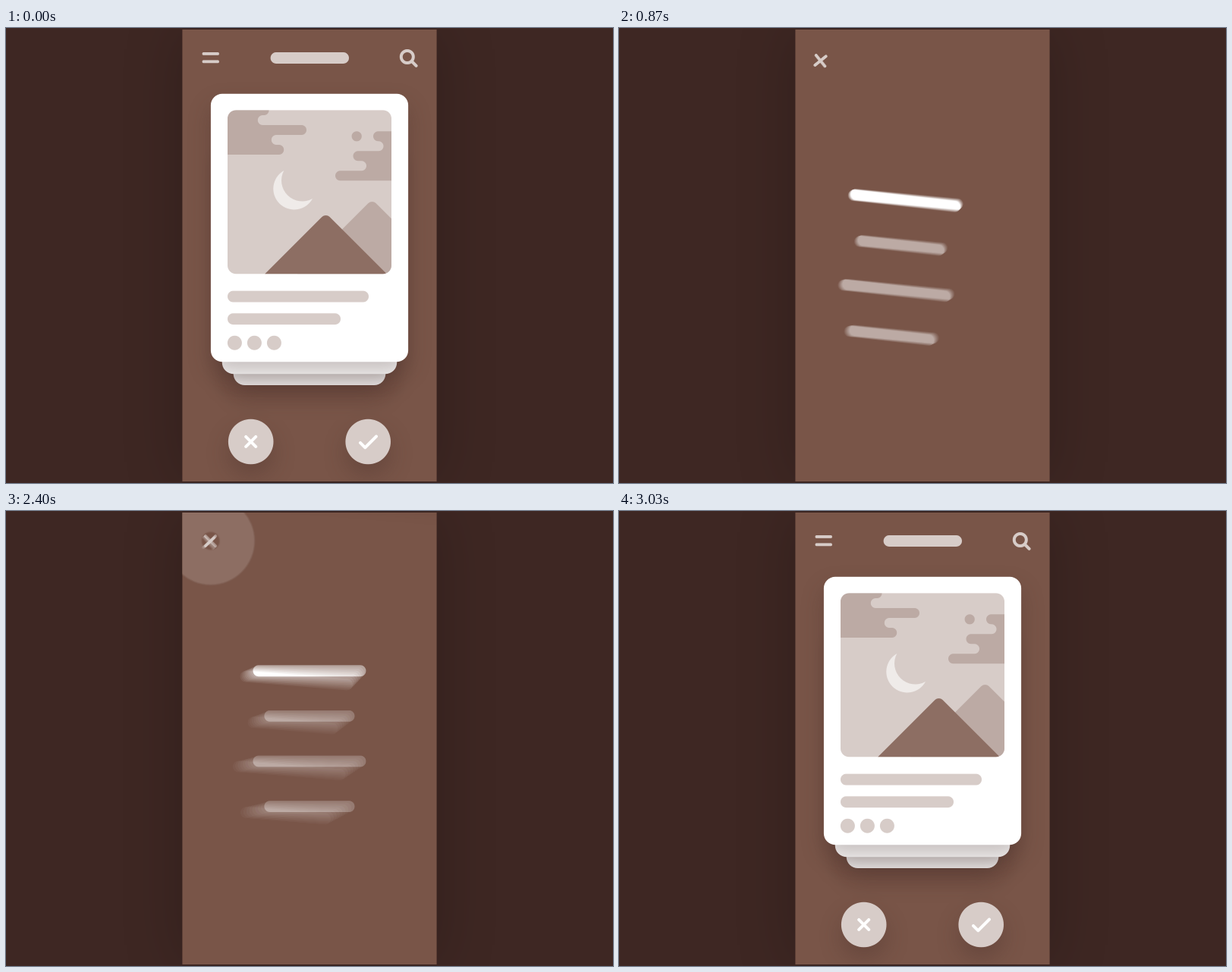
An HTML page with a canvas for the animation above (3.3 s loop, 800 px wide and 600 px high).

```html
<!DOCTYPE html>
<html lang="en">
<head>
<meta charset="utf-8">
<title>Rotating menu</title>
<style>
  html, body { margin: 0; width: 100%; height: 100%; overflow: hidden; background: #3e2723; }
  canvas { display: block; }
</style>
</head>
<body>
<canvas id="stage" width="800" height="600"></canvas>
<script>
const LOOP = 3300, HALF = 1800, STEP = 30;
const SPIN_START = 593, SPIN_TIME = 600, SHUTTER = 13, SAMPLES = 16;
const PIVOT = { x: 232, y: 2 };
const PANEL = [232.4, 2, 335.2, 596];
const BUTTON = { x: 269.7, y: 39.4, r: 37.2 };
const C = {
  back: '#3e2723', panel: '#795548', ring: '#8d6e63',
  light: '#d7ccc8', mid: '#bcaaa4', pale: '#efebe9', white: '#fff'
};

function makeCanvas(w, h) {
  const canvas = document.createElement('canvas');
  canvas.width = w;
  canvas.height = h;
  return canvas.getContext('2d');
}

function setShadow(g, color, blur, dy) {
  g.shadowColor = color;
  g.shadowBlur = blur;
  g.shadowOffsetY = dy;
}

function box(g, x, y, w, h, r, color) {
  g.fillStyle = color;
  g.beginPath();
  g.roundRect(x, y, w, h, r);
  g.fill();
}

function dot(g, x, y, r, color) {
  g.fillStyle = color;
  g.beginPath();
  g.arc(x, y, r, 0, 7);
  g.fill();
}

function shape(g, d, color) {
  g.fillStyle = color;
  g.fill(new Path2D(d));
}

function line(g, d, color, width = 4) {
  g.strokeStyle = color;
  g.lineWidth = width;
  g.lineCap = g.lineJoin = 'round';
  g.stroke(new Path2D(d));
}

function cross(g, x, y, color) {
  line(g, `M${x - 6.5} ${y - 6.5}l13 13m0 -13l-13 13`, color);
}

function mountain(g, x, y, color) {
  g.fillStyle = color;
  g.beginPath();
  g.moveTo(x - 110, y + 110);
  g.arcTo(x, y, x + 110, y + 110, 7.4);
  g.lineTo(x + 110, y + 110);
  g.fill();
}

function drawPicture(g) {
  const cap = 'A6.5 6.5 0 0 ';
  g.save();
  g.beginPath();
  g.roundRect(292, 108.4, 216, 215.8, 11);
  g.clip();
  g.fillStyle = C.light;
  g.fillRect(290, 106, 220, 220);
  shape(g, `M290 100H346.5V108.5${cap}1 340 115H338.3${cap}0 338.3 128H389.5${cap}1 389.5 141` +
    `H356.3${cap}0 356.3 154H359.7${cap}1 359.7 167H290Z`, C.mid);
  shape(g, `M510 136.3H490.5${cap}0 490.5 149.3H491${cap}1 491 162.3H464${cap}0 464 175.3` +
    `H468.5${cap}1 468.5 188.3H440.5${cap}0 440.5 201.3H510Z`, C.mid);
  dot(g, 462.2, 142.8, 6.6, C.mid);
  shape(g, 'M366.3 188A27.5 27.5 0 1 0 404 225A27.5 27.5 0 0 1 366.3 188Z', C.pale);
  mountain(g, 482.5, 226, C.mid);
  mountain(g, 421.5, 244, C.ring);
  g.restore();
}

function drawHome(g) {
  box(g, 258.6, 32, 22.3, 3.9, 1.8, C.light);
  box(g, 258.6, 42.4, 22.3, 3.9, 1.8, C.light);
  box(g, 348.6, 32, 103.4, 15, 7.5, C.light);
  line(g, 'M536.8 38a8 8 0 1 1 -16 0a8 8 0 1 1 16 0M535 44.2L540.6 49.8', C.light);

  setShadow(g, 'rgba(62,39,35,.3)', 60, 30);
  box(g, 299.7, 200, 200.6, 271, 15, C.white);
  box(g, 284.8, 150, 230.4, 306.2, 15, C.white);
  box(g, 269.9, 86.8, 260.2, 353.4, 15, C.white);
  dot(g, 322.7, 545.5, 29.8, C.light);
  dot(g, 477.2, 545.5, 29.8, C.light);
  setShadow(g, 'transparent', 0, 0);

  drawPicture(g);
  box(g, 292, 346.6, 186, 14.9, 7.4, C.light);
  box(g, 292, 376.2, 149, 14.9, 7.4, C.light);
  for (const x of [301.4, 327.4, 353.4]) dot(g, x, 415.2, 9.5, C.light);
  cross(g, 322.7, 545.5, C.white);
  line(g, 'M467 547l6.3 6.3l14.7 -14.7', C.white);
}

function drawMenu(g) {
  cross(g, 269.6, 39.5, C.light);
  for (let i = 0; i < 4; i++) {
    const w = i % 2 ? 119.2 : 149;
    box(g, 400 - w / 2, 203.3 + i * 59.6, w, 14.9, 7.4, i ? C.mid : C.white);
  }
}

// Pages are drawn once at double size, shadows included.
function renderPage(draw) {
  const g = makeCanvas(1000, 1400);
  g.scale(2, 2);
  g.translate(-PIVOT.x, -PIVOT.y);
  draw(g);
  return g.canvas;
}

function renderBackdrop() {
  const g = makeCanvas(800, 600);
  g.fillStyle = C.back;
  g.fillRect(0, 0, 800, 600);
  setShadow(g, 'rgba(0,0,0,.2)', 75, 0);
  g.fillStyle = C.panel;
  g.fillRect(...PANEL);
  return g.canvas;
}

const home = renderPage(drawHome), menu = renderPage(drawMenu);
const backdrop = renderBackdrop();
const screen = document.getElementById('stage').getContext('2d');
const scene = makeCanvas(800, 600);

const progress = (t, start, time) => Math.min(1, Math.max(0, (t - start) / time));
const sine = x => (1 - Math.cos(Math.PI * x)) / 2;
const backOut = x => 1 + 2.70158 * (x - 1) ** 3 + 1.70158 * (x - 1) ** 2;

function drawRipple(g, t) {
  if (t <= 0) return;
  const outer = BUTTON.r * (1 + sine(progress(t, 420, 320)));
  const hole = 2 * BUTTON.r * sine(progress(t, 500, 366));
  if (hole >= outer) return;
  g.globalAlpha = 0.5 + 0.5 * progress(t, 0, 420);
  g.fillStyle = C.ring;
  g.beginPath();
  g.arc(BUTTON.x, BUTTON.y, outer, 0, 2 * Math.PI);
  g.closePath();
  g.moveTo(BUTTON.x + hole, BUTTON.y);
  g.arc(BUTTON.x, BUTTON.y, hole, 0, 2 * Math.PI);
  g.fill('evenodd');
  g.globalAlpha = 1;
}

function drawPage(g, page, degrees) {
  g.save();
  g.translate(PIVOT.x, PIVOT.y);
  g.rotate(degrees * Math.PI / 180);
  g.drawImage(page, 0, 0, 500, 700);
  g.restore();
}

function drawScene(g, t, leaving, entering) {
  const x = progress(t, SPIN_START, SPIN_TIME);
  const turn = 90 * backOut(x);
  g.drawImage(backdrop, 0, 0);
  g.save();
  g.beginPath();
  g.rect(...PANEL);
  g.clip();
  drawRipple(g, t);
  if (x < 1) drawPage(g, leaving, x > 0 ? turn : 0);
  if (x > 0) drawPage(g, entering, turn - 90);
  g.restore();
}

function render(time) {
  const now = Math.floor(time % LOOP / STEP) * STEP;
  const back = now >= HALF;
  const t = back ? now - HALF : now;
  const pages = back ? [menu, home] : [home, menu];
  const moving = t > SPIN_START && t < SPIN_START + SPIN_TIME + SHUTTER;
  const count = moving ? SAMPLES : 1;
  // Average several moments of the open shutter for motion blur.
  for (let i = 0; i < count; i++) {
    drawScene(scene, t - (moving ? SHUTTER * (1 - (i + 0.5) / count) : 0), ...pages);
    screen.globalAlpha = 1 / (i + 1);
    screen.drawImage(scene.canvas, 0, 0);
  }
}

const begin = performance.now();
function tick() {
  render(performance.now() - begin);
  requestAnimationFrame(tick);
}
tick();
</script>
</body>
</html>
```
